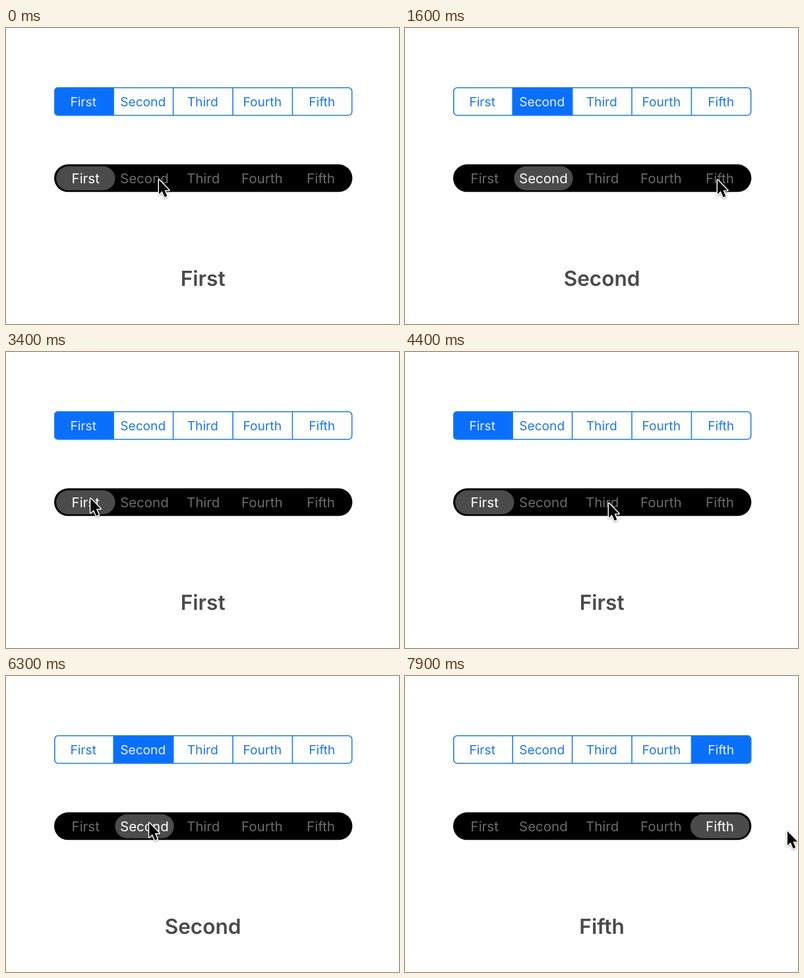
An HTML page for the animation above (8000 ms loop, 596x450 px).

```html
<!DOCTYPE html>
<html lang="en">
<head>
<meta charset="utf-8">
<title>Segmented controls</title>
<style>
  html, body { margin: 0; width: 100%; height: 100%; overflow: hidden; background: #fff; }
  svg { display: block; width: 596px; height: 450px; }
  text { font-family: Inter, Roboto, sans-serif; text-anchor: middle; text-rendering: geometricPrecision; }
  .tab { font-size: 19.2px; fill: #1c78e2; }
  .tab.on { fill: #e9f2ff; }
  .dim, .lit { font-size: 20.5px; }
  .dim { fill: #6c6c6c; }
  .lit { fill: #fff; }
  #title { font-size: 31.6px; font-weight: 600; fill: #4a4a4a; }
  #pointer { filter: drop-shadow(0 1.5px 1.5px rgba(0, 0, 0, .38)); }
</style>
</head>
<body>
<svg viewBox="0 0 596 450">
  <defs>
    <clipPath id="frame"><rect x="73" y="90" width="452.3" height="43.4" rx="6"/></clipPath>
    <clipPath id="lens"><rect class="pill" y="210.3" width="89.3" height="36.4" rx="18.2"/></clipPath>
  </defs>

  <rect id="fill" y="90" width="91.5" height="43.4" fill="#0a6ffb" clip-path="url(#frame)"/>
  <g id="tabs" fill="none" stroke="#1f7de6" stroke-width="1.6">
    <rect x="73.8" y="90.8" width="450.8" height="42" rx="5.4"/>
  </g>
  <g id="tabText"></g>

  <rect x="73" y="207.3" width="452.3" height="42" rx="21"/>
  <g id="dimText"></g>
  <rect class="pill" y="210.3" width="89.3" height="36.4" rx="18.2" fill="#4b4b4b"/>
  <g id="litText" clip-path="url(#lens)"></g>

  <text id="title" x="298.6" y="392"></text>
  <g id="pointer">
    <path d="M0 0V21.6L4.8 17.1L8.7 26.2L12.3 24.7L8.5 15.7H15.2Z"
      stroke="#fff" stroke-width="3" stroke-linejoin="round" paint-order="stroke"/>
  </g>
</svg>
<script>
const LOOP = 8000, TICK = 100, SLIDE = 250;
const names = ["First", "Second", "Third", "Fourth", "Fifth"];

const taps = [
  { at: -SLIDE, pick: 0 },
  { at: 60, pick: 1 },
  { at: 1960, pick: 4 },
  { at: 2960, pick: 0 },
  { at: 4740, pick: 3 },
  { at: 5960, pick: 1 },
  { at: 7160, pick: 4 }
];

// Eased pointer strokes; sag bends a stroke downwards.
const home = [232, 230.8];
const strokes = [
  { from: 580, to: 1180, end: [474, 231] },
  { from: 2110, to: 2700, end: [127, 230], sag: 5 },
  { from: 3300, to: 3400, end: [128.3, 222.8] },
  { from: 3500, to: 3800, end: [137, 229] },
  { from: 3900, to: 4700, end: [388.7, 230.5] },
  { from: 5300, to: 5900, end: [217.2, 223.3] },
  { from: 6300, to: 7100, end: [455, 231] },
  { from: 7180, to: 7600, end: [580, 236] }
];

const get = id => document.getElementById(id);
const mix = (a, b, p) => a + (b - a) * p;
const clamp = p => Math.max(0, Math.min(1, p));
const smooth = p => p * p * (3 - 2 * p);

function add(parent, tag, attrs, words = "") {
  const el = document.createElementNS("http://www.w3.org/2000/svg", tag);
  for (const key in attrs) el.setAttribute(key, attrs[key]);
  el.textContent = words;
  get(parent).append(el);
  return el;
}

const tabs = names.map((name, i) => {
  const x = 120.7 + i * 89.2;
  if (i) add("tabs", "path", { d: `M${72.8 + i * 90.4} 91v42` });
  add("dimText", "text", { class: "dim", x, y: 236 }, name);
  add("litText", "text", { class: "lit", x, y: 236 }, name);
  return add("tabText", "text", { class: "tab", x: 117.2 + i * 90.5, y: 118.6 }, name);
});
const pills = document.querySelectorAll(".pill");

function pointerAt(t) {
  let [x, y] = home;
  for (const { from, to, end, sag = 0 } of strokes) {
    const p = smooth(clamp((t - from) / (to - from)));
    x = mix(x, end[0], p);
    y = mix(y, end[1], p) + sag * Math.sin(Math.PI * p);
  }
  return [x, y];
}

function draw(t) {
  const n = taps.filter(tap => tap.at <= t).length - 1;
  const { at, pick } = taps[n];
  const last = n ? taps[n - 1].pick : pick;
  const left = 1 - clamp((t - at) / SLIDE);
  const x = 76.2 + 89.2 * mix(last, pick, 1 - left * left);

  pills.forEach(el => el.setAttribute("x", x));
  get("fill").setAttribute("x", 72.4 + pick * 90.4);
  tabs.forEach((el, i) => el.classList.toggle("on", i === pick));
  get("title").textContent = names[pick];
  get("pointer").setAttribute("transform", `translate(${pointerAt(t)})`);
}

const begin = performance.now();
function run() {
  const t = (performance.now() - begin) % LOOP;
  draw(Math.floor(t / TICK) * TICK);
  requestAnimationFrame(run);
}
run();
</script>
</body>
</html>
```
